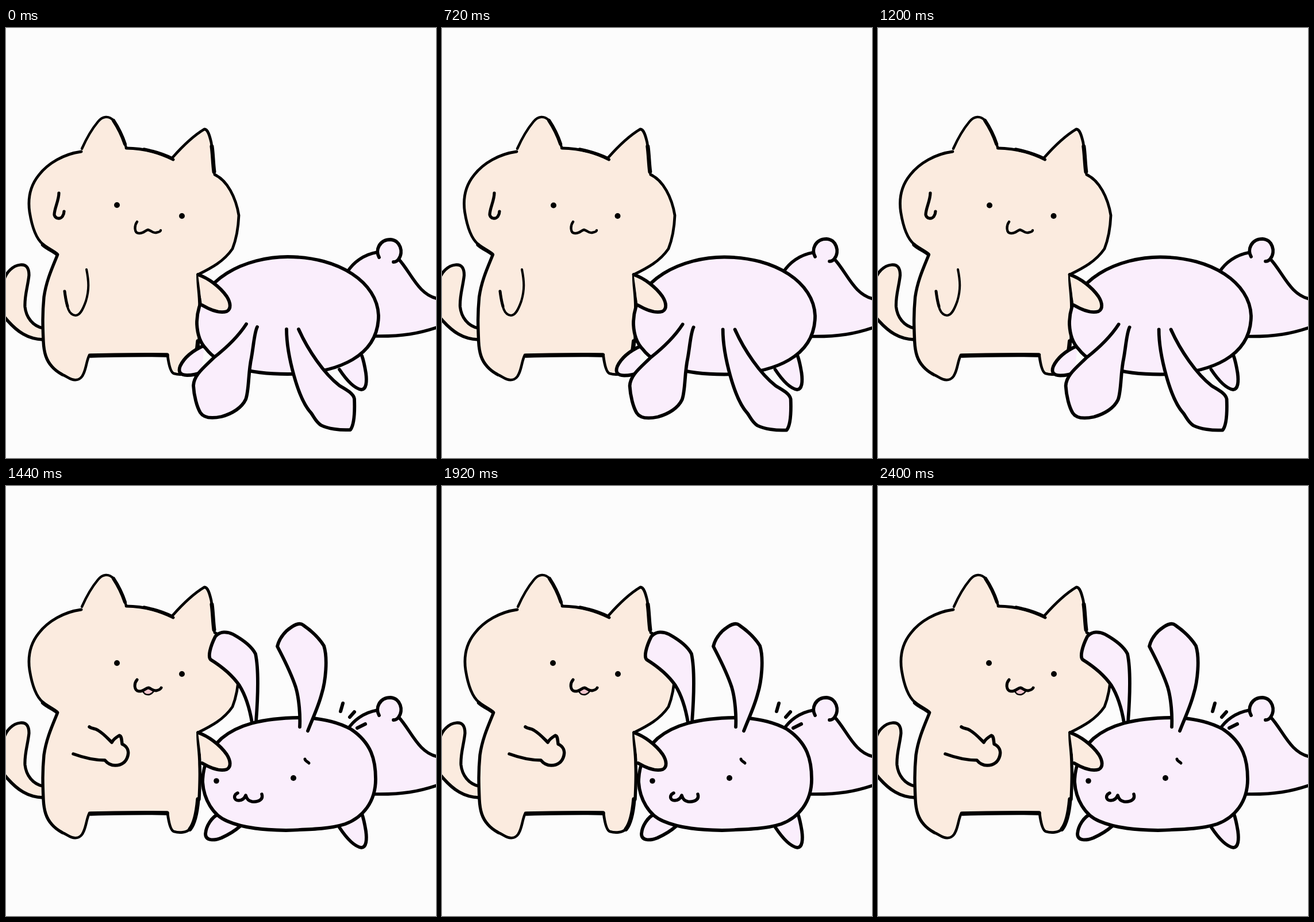
Write an HTML page that moves like this. It is 748x748 px and loops after 2440 ms.

```html
<!DOCTYPE html>
<html lang="en">
<head>
<meta charset="utf-8">
<title>Cat and rabbit</title>
<style>
  html, body { margin: 0; width: 100%; height: 100%; overflow: hidden; background: #fcfcfc; }
  svg { display: block; width: 100%; height: 100%; }
  path { stroke: #000; stroke-linecap: round; stroke-linejoin: round; }
</style>
</head>
<body>
<svg id="stage" viewBox="0 0 748 748"></svg>
<script>
const LOOP = 2440, REVEAL = 1280, BEAT = 240;
const CAT = '#fbebdf', RABBIT = '#faeefc', TONGUE = '#f2c6cd';

const line = (d, width = 5.5, fill = 'none') =>
  `<path d="${d}" stroke-width="${width}" fill="${fill}"/>`;
const blob = (d, fill) => `<path d="${d}" fill="${fill}" style="stroke:none"/>`;
const dot = (x, y, r = 5) => `<circle cx="${x}" cy="${y}" r="${r}"/>`;
// "shift" is the transform used on every second beat, for the hand-drawn wobble.
const part = (shift, ...items) => `<g data-shift="${shift}">${items.join('')}</g>`;
const pose = (name, ...items) => `<g class="${name}">${items.join('')}</g>`;

// Cat silhouette, counter-clockwise from the left ear; each stroke has its own weight.
const catOutline = [
  ['M131 215 C101 219 73 235 57 256 C40 277 38 299 41 320 C45 345 52 366 64 376 C73 384 83 387 89 394', 4.8],
  ['M89 396 C80 418 70 440 66 468 C63 500 64 520 65 545 C66 565 70 578 80 589 C87 597 93 600 98 603', 5.4],
  ['M98 603 C104 605 108 609 114 611 C123 614 131 611 135 601 C140 590 140 579 145 569', 4.6],
  ['M147 570 C190 569 240 568 280 569', 7.4],
  ['M281 569 C283 585 286 599 292 601 C302 604 313 603 320 597', 4.8],
  ['M320 597 C328 587 332 568 334 545', 7.4],
  ['M336 545 C337 525 338 505 337 485 C337 460 333 445 334 429', 5.4],
  ['M334 429 C358 417 379 406 394 384 C401 366 404 350 405 326 C400 295 385 265 363 255', 4.8],
  ['M362 252 C360 235 360 218 357 199 C354 186 351 176 345 176 C325 188 305 208 290 225', 4.8],
  ['M291 229 C265 216 236 209 209 209', 4.8],
  ['M209 208 C204 190 196 174 187 161 C179 152 168 153 160 163 C150 175 140 192 132 210', 4.4],
];
const catFill = catOutline.map(([d], i) => i ? d.replace('M', 'L') : d).join(' ') + 'Z';

const catTail = 'M-4 440 C0 425 12 413 25 412 C36 411 40 418 40 430 C38 450 32 465 33 485 C35 503 46 518 64 522';
const cat = part('translate(-1.6 0) scale(1.004 1)',
  blob(catTail + ' L65 543 C40 541 20 531 -4 501Z', CAT),
  line(catTail, 5.2), line('M64 542 C40 541 20 531 -4 501', 5.6),
  blob(catFill, CAT),
  ...catOutline.map(([d, width]) => line(d, width)),
  line('M362 250 C360 235 360 220 358 206', 7),
  line('M187 161 C195 173 202 187 207 202', 6),
  line('M64 377 C73 385 83 388 89 394', 6.5),
  line('M240 211 C260 215 275 220 289 227', 5.5),
  line('M335 433 L336 450', 6.5)
) + part('translate(1 .5)', dot(193, 308))
  + part('translate(-.5 0)', dot(306, 327));

const catSideArm = part('translate(-.5 0)',
  line('M334 429 C352 435 372 450 384 467 C391 478 392 489 384 493 C371 497 353 489 341 482', 5.8, CAT));

const worriedCat = part('translate(-1 0)',
  line('M140 420 C144 440 145 455 139 475 C133 492 128 500 121 500 C109 499 106 487 102 458', 4),
  line('M107 484 C104 474 103 466 102 458', 5),
  line('M92 287 C92 300 84 314 84 325 C86 332 94 333 98 328 C100 325 101 322 101 319', 5.2)
) + line('M228 337 C223 344 223 357 231 357 C239 358 242 352 247 351 C252 352 255 357 261 356 C266 355 269 354 269 352', 4.4);

const happyCat = part('translate(-1 0)',
  line('M145 419 C150 423 155 421 160 425 C170 431 176 438 184 446 C187 440 192 437 197 434 C201 435 201 440 202 449 C211 453 214 461 212 469 C209 481 200 486 190 486 C182 486 176 482 172 477 C153 477 136 473 117 466', 5.5)
) + line('M238 357 C242 365 251 365 257 357 L248 351Z', 2.6, TONGUE)
  + line('M228 337 C222 344 223 356 231 357 C239 358 243 351 248 351 C252 352 255 356 261 356 C266 355 269 353 270 351', 5);

const rump = part('translate(0 .5)',
  blob('M594 424 C604 408 622 394 646 390 L681 402 C704 424 717 465 752 471 L752 520 C720 531 690 537 640 536Z', RABBIT),
  line('M594 424 C604 408 622 394 646 390'),
  line('M683 402 C704 424 717 465 752 471'),
  line('M640 536 C690 537 720 531 752 520')
) + part('translate(0 -1.2)',
  line('M649 399 C642 387 649 368 669 368 C686 369 692 390 683 402 C681 405 678 407 674 407', 5.8, RABBIT));

const rightFoot = part('translate(-.5 0)',
  line('M580 594 C592 612 606 627 618 629 C627 629 628 615 626 600 C624 588 622 578 619 570', 5.8, RABBIT));

const slumpedRabbit = [
  part('translate(2 .5)',
    line('M345 552 C325 561 310 573 303 588 C299 598 303 604 315 604 C325 604 333 602 340 599', 5.8, RABBIT)),
  part('translate(1 .5)',
    line('M490 398 C420 398 331 435 332 515 C333 535 338 548 348 558 C370 587 420 602 490 602 C580 601 648 570 648 500 C646 443 580 398 490 398Z', 5.8, RABBIT)),
].join('');

const droopingEars = part('translate(.6 .5)',
  line('M418 515 C405 535 385 555 362 573 C345 590 327 603 326 622 C327 640 332 659 338 669 C345 680 361 679 375 676 C393 671 410 661 417 646 C423 630 421 600 427 573 C431 550 432 530 437 520', 5.8, RABBIT),
  line('M488 524 C488 550 494 580 501 605 C508 630 517 655 531 670 C536 677 539 685 548 691 C560 697 580 700 599 699 C606 690 607 670 606 645 C604 635 590 628 580 622 C553 601 525 560 509 524', 5.8, RABBIT));

const risenRabbit = [
  part('translate(.5 .5)',
    line('M372 569 C357 576 348 592 347 605 C347 618 363 617 375 612 C388 606 398 600 407 592', 5.8, RABBIT)),
  part('translate(-.5 .6)',
    line('M428 412 C424 388 416 363 406 347 C393 328 372 312 356 302 C351 297 355 280 364 262 C372 252 385 253 395 258 C413 268 428 280 434 292 C440 320 438 370 435 410', 5.8, RABBIT)),
  part('translate(.8 .5)',
    line('M525 403 C440 402 400 418 375 439 C352 460 342 490 342 515 C344 545 360 573 385 583 C415 596 450 598 487 599 C540 597 565 596 590 588 C620 577 643 550 643 510 C643 477 636 447 600 423 C578 411 555 406 525 403Z', 5.8, RABBIT)),
  part('translate(.6 -.5)',
    line('M511 419 C512 400 510 370 504 350 C494 320 480 295 472 279 C474 270 480 260 488 252 C500 242 510 236 517 242 C530 251 545 265 553 278 C560 300 556 340 549 362 C543 385 533 405 525 426', 5.8, RABBIT)),
  part('translate(.5 0)',
    dot(366, 513, 4.8), dot(500, 508),
    line('M520 475 C520 478 524 479 527 482', 5),
    line('M403 534 C395 538 396 547 405 547 C412 547 415 543 417 538 C419 545 422 548 428 549 C440 550 448 545 445 536')),
].join('');

const sparks = part('translate(.5 0)',
  line('M582 392 L586 378', 6), line('M598 402 L606 393', 6), line('M611 421 L625 414', 6));

const stage = document.getElementById('stage');
stage.innerHTML = [
  cat,
  pose('before', worriedCat), pose('after', happyCat),
  rump, rightFoot,
  pose('before', slumpedRabbit), pose('after', risenRabbit, sparks),
  catSideArm,
  pose('before', droopingEars),
].join('');

const parts = [...stage.querySelectorAll('[data-shift]')];
const before = stage.querySelectorAll('.before');
const after = stage.querySelectorAll('.after');
const show = (groups, on) => groups.forEach(g => g.setAttribute('display', on ? 'inline' : 'none'));

function draw(time) {
  const t = time % LOOP;
  const wobbling = Math.floor(t / BEAT) % 2 === 1;
  show(before, t < REVEAL);
  show(after, t >= REVEAL);
  parts.forEach(p => p.setAttribute('transform', wobbling ? p.dataset.shift : ''));
}

const start = performance.now();
function tick() {
  draw(performance.now() - start);
  requestAnimationFrame(tick);
}
tick();
</script>
</body>
</html>
```
